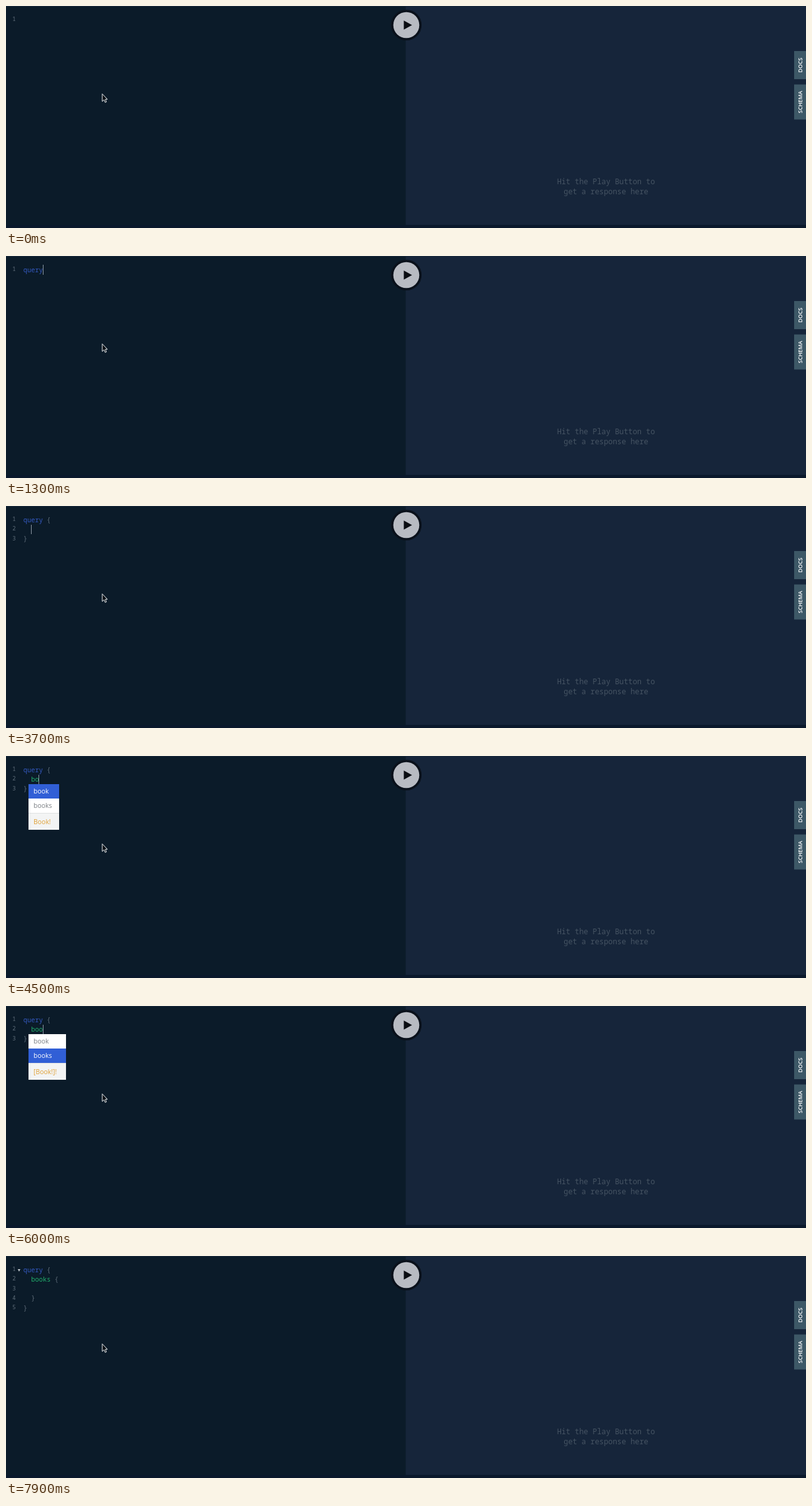
An HTML page that plays this animation: 1280x355 px, repeating every 8 s.

```html
<!DOCTYPE html>
<html lang="en">
<head>
<meta charset="utf-8">
<title>Query editor</title>
<style>
  html, body { margin: 0; width: 100%; height: 100%; overflow: hidden; background: #0b1b29; }
  svg { display: block; width: 1280px; height: 355px; }
  text { white-space: pre; }
  .mono { font-family: "Noto Sans Mono", "DejaVu Sans Mono", monospace; }
  .sans { font-family: "Open Sans", "Noto Sans", sans-serif; }
  .code { font-size: 10.4px; }
  .num { font-size: 8.9px; fill: #62707c; }
  .hint { font-size: 11.88px; fill: #465463; text-anchor: middle; }
  .item { font-size: 10.4px; }
  .tab { font-size: 8.8px; font-weight: 600; fill: #fff; text-anchor: middle; }
</style>
</head>
<body>
<svg viewBox="0 0 1280 355" xmlns="http://www.w3.org/2000/svg">
  <rect width="640" height="355" fill="#0b1b29"/>
  <rect x="639.5" width="640.5" height="355" fill="#16253a"/>
  <rect width="1280" height="1" fill="#14273a"/>
  <rect y="350" width="1280" height="5" fill="#0a182b"/>
  <circle cx="640.5" cy="30.5" r="24.5" fill="#0a111b"/>
  <circle cx="640.5" cy="30.5" r="20.8" fill="#b8bbc2"/>
  <path d="M636.5 23.2L649.7 30.5L636.5 37.8Z" fill="#0a0d12"/>
  <text class="mono hint" x="960" y="284.6">Hit the Play Button to</text>
  <text class="mono hint" x="960" y="301.2">get a response here</text>
  <path d="M1261 72h19v45h-19zM1261 125.5h19v56h-19z" fill="#3d5866"/>
  <text class="sans tab" transform="translate(1273.7 94.5) rotate(-90)">DOCS</text>
  <text class="sans tab" transform="translate(1273.7 153.5) rotate(-90)">SCHEMA</text>
  <g id="editor"></g>
  <path d="M154 140.5V152.6L156.8 150L158.7 154.2L160.7 153.3L158.9 149.2H162.2Z"
        fill="#0b0f14" stroke="#eef1f3" stroke-width="1"/>
</svg>
<script>
const LOOP = 8000, LEFT = 27.8, CHAR = 6.24, ROW = 15.2;
const editor = document.getElementById('editor');

const open3 = ['query {', '', '}'];
const open5 = ['query {', '  books {', '', '  }', '}'];
const typing = name => ['query {', '  ' + name, '}'];

const starts = { x: 23.7, y: 30, w: 44.3, items: ['query', '{'], pick: 0, foot: 14 };
const startOnly = { ...starts, items: ['query'] };
const fields = { x: 36, y: 45, w: 49, items: ['book', 'books'], pick: 0, foot: 27, type: 'Book!' };
const fieldsNext = { ...fields, w: 60, pick: 1, type: '[Book!]!' };

// time, lines, caret [row, column] or null, popup, fold mark
const steps = [
  [0, [''], null],
  [300, [''], [0, 0]],
  [500, ['q'], [0, 1], starts],
  [600, ['qu'], [0, 2], starts],
  [700, ['que'], [0, 3], startOnly],
  [1000, ['quer'], [0, 4], startOnly],
  [1300, ['query'], [0, 5]],
  [1700, ['query '], [0, 6]],
  [2000, ['query {}'], [0, 7]],
  [2600, ['query {}'], null],
  [2700, open3, [1, 2]],
  [3200, open3, null],
  [3700, open3, [1, 2]],
  [4300, typing('b'), [1, 3]],
  [4400, typing('b'), [1, 3], fields],
  [4500, typing('bo'), [1, 4], fields],
  [4700, typing('boo'), [1, 5], fields],
  [5200, typing('boo'), null, fields],
  [5800, typing('boo'), [1, 5], fields],
  [6000, typing('boo'), [1, 5], fieldsNext],
  [6200, typing('books'), [1, 7]],
  [6600, typing('books '), [1, 8]],
  [7100, typing('books {}'), [1, 9]],
  [7400, open5, [2, 4]],
  [7800, open5, [2, 4], null, true],
  [7900, open5, null, null, true]
];

const rect = (x, y, w, h, fill) =>
  `<rect x="${x}" y="${y}" width="${w}" height="${h}" fill="${fill}"/>`;
const text = (cls, x, y, s, style = '') =>
  `<text class="${cls}" x="${x}" y="${y}" style="${style}">${s}</text>`;

function tokenStyle(token, row) {
  if (/[{}]/.test(token)) return 'fill:#5d6b77';
  if (row > 0) return 'fill:#20ae6c';
  return token === 'query' ? 'fill:#3459c0' : 'fill:#b3180f;font-weight:700';
}

function drawLine(line, row) {
  let out = text('mono num', 10.3, 24.2 + row * ROW, row + 1);
  for (const m of line.matchAll(/[a-z]+|[{}]/g))
    out += text('mono code', LEFT + m.index * CHAR, 25.7 + row * ROW, m[0], tokenStyle(m[0], row));
  return out;
}

function drawCaret([row, col]) {
  const y = [14, 30, 45][row];
  return rect(Math.floor(28 + col * CHAR), y, 1, row ? 15 : 16, '#8c98a3');
}

function drawPopup({ x, y, w, items, pick, foot, type }) {
  const rowH = 23, end = y + items.length * rowH;
  let out = '';
  items.forEach((name, i) => {
    const on = i === pick, top = y + i * rowH;
    out += rect(x, top, w, rowH, on ? '#315fd6' : '#fff');
    out += text('sans item', x + 8.1, top + 15.3, name, on ? 'fill:#fff' : 'fill:#7b7f84');
  });
  out += rect(x, end, w, foot, '#f3f4f4') + rect(x, end, w, 1, '#dfe1e2');
  if (type) out += text('sans item', x + 8.1, end + 17.9, type, 'fill:#dfa036');
  return out;
}

function draw(t) {
  const [, lines, caret, popup, fold] = steps.findLast(s => s[0] <= t);
  let out = lines.map(drawLine).join('');
  if (fold) out += '<path d="M18.8 21H23L20.9 25Z" fill="#c3c9ce"/>';
  if (caret) out += drawCaret(caret);
  if (popup) out += drawPopup(popup);
  return out;
}

let shown = '', origin = performance.now();
function tick(now) {
  const next = draw(Math.max(0, now - origin) % LOOP);
  if (next !== shown) editor.innerHTML = shown = next;
  requestAnimationFrame(tick);
}
tick(origin);
</script>
</body>
</html>
```
